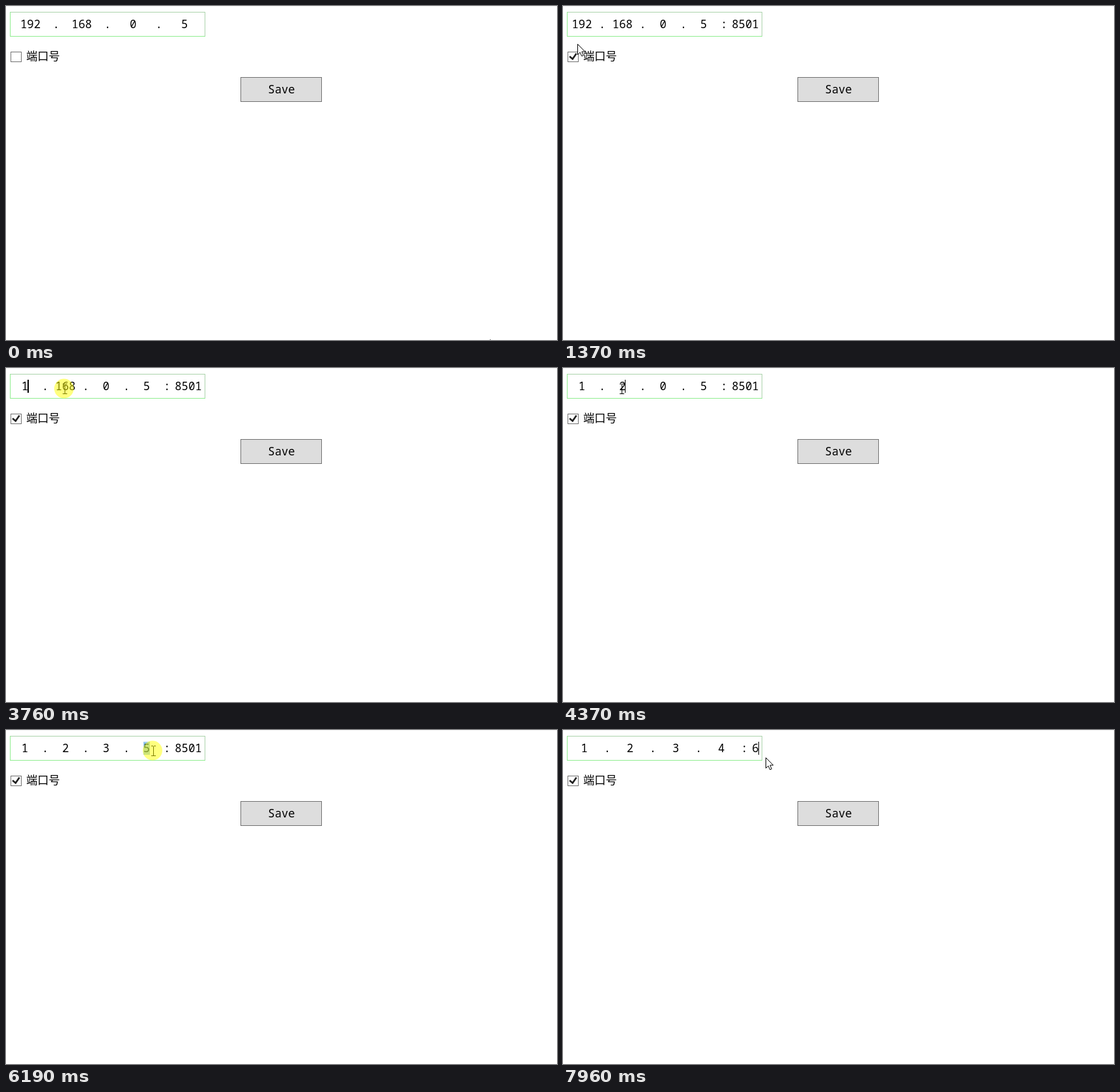
Write an HTML page with a canvas that moves like this. It is 846 by 512 pixels and loops after 8000 ms.

```html
<!DOCTYPE html>
<html lang="zh">
<head>
<meta charset="utf-8">
<title>IP input</title>
<style>
  html, body { margin: 0; width: 100%; height: 100%; overflow: hidden; background: #fff; }
  canvas { display: block; }
</style>
</head>
<body>
<canvas id="stage" width="846" height="512"></canvas>
<script>
const ctx = document.getElementById('stage').getContext('2d');
const LOOP = 8000;
const MONO = '17.25px "Noto Sans Mono", monospace';
const ADVANCE = 10.35;

// Pointer moves: start, end, number of steps, points along the way
const moves = [
  { from: 70, to: 810, steps: 12, path: [[743, 511], [470, 210], [120, 14], [18, 79]] },
  { from: 1220, to: 1560, steps: 6, path: [[18, 79], [22, 58], [35, 34]] },
  { from: 1960, to: 2100, steps: 3, path: [[37, 34], [76, 42], [111, 30]] },
  { from: 2280, to: 2410, steps: 3, path: [[111, 30], [98, 31]] },
  { from: 2740, to: 2741, steps: 1, path: [[98, 31], [97, 31]] },
  { from: 3480, to: 3700, steps: 4, path: [[97, 31], [90, 32]] },
  { from: 4380, to: 4790, steps: 7, path: [[90, 32], [122, 37], [157, 35]] },
  { from: 4930, to: 4931, steps: 1, path: [[157, 35], [159, 26]] },
  { from: 5130, to: 5131, steps: 1, path: [[159, 26], [161, 27]] },
  { from: 5600, to: 5930, steps: 6, path: [[161, 27], [190, 40], [210, 28]] },
  { from: 5990, to: 6190, steps: 4, path: [[210, 28], [226, 32]] },
  { from: 6790, to: 7130, steps: 6, path: [[226, 32], [250, 30], [275, 26]] },
  { from: 7740, to: 7960, steps: 4, path: [[275, 26], [311, 42]] }
];

// Times while the mouse button is held
const presses = [[880, 1080], [1560, 1700], [3760, 3960], [4860, 5130], [5990, 6520], [7200, 7340]];

// Changes of the form; each entry updates the state before it
const events = [
  [0, { parts: ['192', '168', '0', '5'], port: null, checked: false, sel: -1, caret: -1 }],
  [1015, { port: '8501', checked: true }],
  [1700, { sel: 0 }],
  [3270, { parts: ['1', '168', '0', '5'], sel: -1, caret: 0 }],
  [3830, { sel: 1, caret: -1 }],
  [4170, { parts: ['1', '2', '0', '5'], sel: -1, caret: 1 }],
  [4930, { caret: 2 }],
  [5330, { parts: ['1', '2', '', '5'] }],
  [5470, { parts: ['1', '2', '3', '5'] }],
  [6060, { sel: 3, caret: -1 }],
  [6590, { parts: ['1', '2', '3', '4'], sel: -1, caret: 3 }],
  [7270, { sel: 4, caret: -1 }],
  [7740, { port: '6', sel: -1, caret: 4 }]
];

function alongPath(path, u) {
  const at = u * (path.length - 1);
  const i = Math.min(path.length - 2, Math.floor(at));
  const [a, b] = [path[i], path[i + 1]];
  return a.map((v, k) => Math.round(v + (b[k] - v) * (at - i)));
}

function pointerAt(t) {
  let pos = moves[0].path[0];
  for (const m of moves) {
    if (t < m.from) break;
    const done = Math.min(1, (t - m.from) / (m.to - m.from));
    const step = Math.floor(done * (m.steps - 1) + 1e-6) + 1;
    pos = alongPath(m.path, step / m.steps);
  }
  return pos;
}

function stateAt(t) {
  return Object.assign({}, ...events.filter(e => e[0] <= t).map(e => e[1]));
}

function rect(color, x, y, w, h) {
  ctx.fillStyle = color;
  ctx.fillRect(x, y, w, h);
}

function frame(x, y, w, h, line, fill) {
  rect(line, x, y, w, h);
  rect(fill, x + 1, y + 1, w - 2, h - 2);
}

function text(str, x, y, font = MONO, align = 'center') {
  ctx.font = font;
  ctx.textAlign = align;
  ctx.fillStyle = '#000';
  ctx.fillText(str, x, y);
}

function drawAddress(s) {
  frame(6, 9, 300, 38, '#90ee90', '#fff');
  rect('#abd3ab', 7, 9, 299, 1);
  rect('#abd3ab', 305, 10, 1, 36);

  const pitch = s.port === null ? 78.9 : 62.35 + (4 - s.port.length) * 2.6;
  const first = s.port === null ? 37.5 : s.port.length === 4 ? 29 : 32.8;
  const cells = s.parts.map((str, i) => ({ str, x: first + i * pitch }));
  cells.forEach((c, i) => {
    if (i < 3) text('.', c.x + pitch / 2, 34);
  });
  if (s.port !== null) {
    text(':', cells[3].x + pitch / 2, 34);
    cells.push({ str: s.port, x: 300.6 - s.port.length * ADVANCE / 2 });
  }
  cells.forEach((c, i) => {
    const half = c.str.length * ADVANCE / 2;
    text(c.str, c.x, 34);
    if (i === s.sel) {
      rect('rgba(0,120,215,0.4)', Math.round(c.x - half), 18, Math.round(half * 2), 20);
    }
    if (i === s.caret) {
      rect('#000', Math.floor(c.x + half - 0.6), 18, i === 0 ? 2 : 1, 20);
    }
  });
}

function drawCheck(checked, hover) {
  frame(7, 70, 17, 16, hover ? '#5593c5' : '#707070', hover ? '#f3f9ff' : '#fff');
  if (checked) {
    ctx.save();
    ctx.translate(9.2, 72);
    ctx.scale(1.25, 1.2);
    ctx.fillStyle = '#212121';
    ctx.fill(new Path2D('M10 1.2L4.7 9.1H4.5L0 5.2 1.3 3.5 4.25 6.1 8.3 0Z'));
    ctx.restore();
  }
  text('端口号', 31, 82.5, '17.3px "Noto Sans CJK SC", "Noto Sans CJK", sans-serif', 'left');
}

function drawButton(hover) {
  frame(360, 109, 125, 38, hover ? '#3c7fb1' : '#707070', hover ? '#bee6fd' : '#ddd');
  text('Save', 423, 134);
}

function drawPointer(x, y, beam) {
  if (beam) {
    rect('#000', x, y - 7, 1, 15);
    for (const dy of [-8, 7]) {
      rect('#000', x - 3, y + dy, 3, 1);
      rect('#000', x + 1, y + dy, 3, 1);
    }
    return;
  }
  ctx.save();
  ctx.translate(x + 0.5, y + 0.5);
  const arrow = new Path2D('M0 0V16L3.7 12.6 6.3 18.3 8.9 17.2 6.4 11.5H11.3Z');
  ctx.fillStyle = '#fff';
  ctx.fill(arrow);
  ctx.strokeStyle = '#000';
  ctx.lineWidth = 1;
  ctx.stroke(arrow);
  ctx.restore();
}

function inside(x, y, left, top, right, bottom) {
  return x >= left && x < right && y >= top && y < bottom;
}

function draw(t) {
  const s = stateAt(t);
  const [x, y] = pointerAt(t);
  rect('#fff', 0, 0, 846, 512);
  rect('#f5f5f5', 0, 0, 846, 1);
  drawAddress(s);
  drawCheck(s.checked, inside(x, y, 7, 68, 84, 88));
  drawButton(inside(x, y, 360, 109, 485, 147));
  drawPointer(x, y, inside(x, y, 6, 9, 306, 47));
  if (presses.some(([a, b]) => t >= a && t < b)) {
    ctx.fillStyle = 'rgba(255,255,0,0.5)';
    ctx.beginPath();
    ctx.arc(x - 1, y - 0.5, 15, 0, Math.PI * 2);
    ctx.fill();
  }
}

const start = performance.now();
function tick() {
  draw((performance.now() - start) % LOOP);
  requestAnimationFrame(tick);
}
tick();
</script>
</body>
</html>
```
